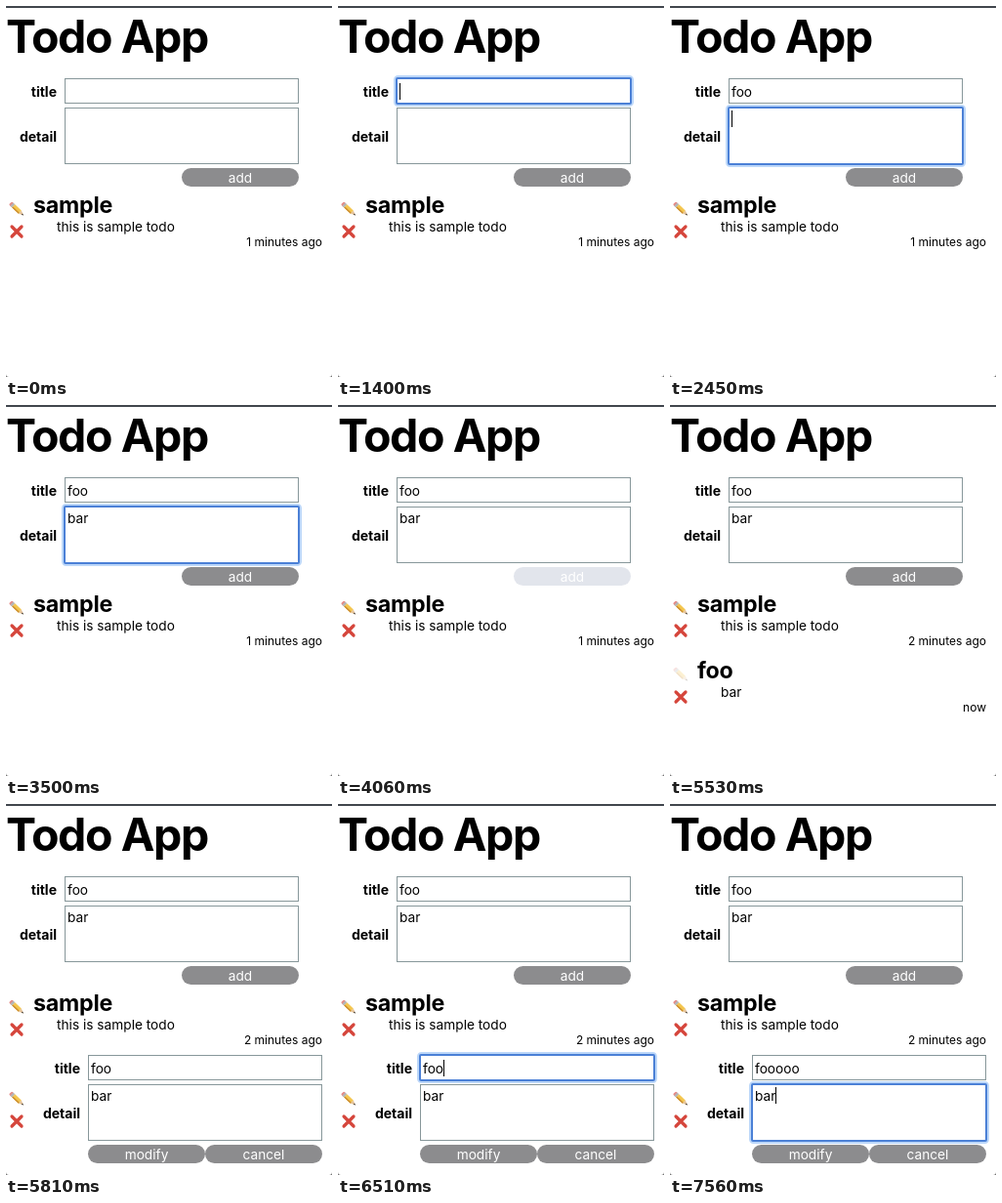
These frames come from a looping animation (334 px wide and 380 px high, 8 s). An HTML page:

```html
<!DOCTYPE html>
<html lang="en">
<head>
<meta charset="utf-8">
<title>Todo App</title>
<style>
  html, body { margin: 0; width: 100%; height: 100%; overflow: hidden; background: #fff; }
  svg { display: block; width: 334px; height: 380px; }
  text { font: 13.7px Inter, "Noto Sans", sans-serif; fill: #000; }
  .heading { font-size: 46.5px; font-weight: 700; letter-spacing: -1.4px; }
  .name { font-size: 23.25px; font-weight: 700; letter-spacing: -.25px; }
  .label { font-size: 14px; font-weight: 700; text-anchor: end; }
  .age { font-size: 12px; text-anchor: end; }
  .button { fill: #fff; text-anchor: middle; }
  .field { fill: #fff; stroke: #87979a; }
  .glow { fill: none; stroke: #8fbcf6; stroke-width: 3; stroke-opacity: .6; }
  .ring { fill: none; stroke: #4b80d6; stroke-width: 2; }
</style>
</head>
<body>
<svg id="stage" viewBox="0 0 334 380"></svg>
<script>
const LOOP = 8000;
const stage = document.getElementById('stage');
const pen = document.createElement('canvas').getContext('2d');
pen.font = '13.7px Inter, "Noto Sans", sans-serif';

const text = (x, y, value, kind = '') => `<text x="${x}" y="${y}" class="${kind}">${value}</text>`;

// Text typed so far: one more character at each given time.
const typed = (t, start, added, times) => start + added.slice(0, times.filter(at => t >= at).length);

function field(x, y, height, value, focused, caretOn = true) {
  const box = (grow, kind, radius = 0) =>
    `<rect x="${x - grow}" y="${y - grow}" width="${240 + 2 * grow}" height="${height + 2 * grow}" rx="${radius}" class="${kind}"/>`;
  const top = height > 30 ? y + 3 : y + 5;
  let out = focused ? box(1.5, 'glow', 3) + box(-.5, 'field') + box(0, 'ring', 1) : box(-.5, 'field');
  out += text(x + 3, top + 14, value);
  if (focused && caretOn) {
    const caretX = Math.round(x + 3 + pen.measureText(value).width);
    out += `<rect x="${caretX}" y="${top}" width="1" height="17"/>`;
  }
  return out;
}

function button(x, y, label, disabled = false) {
  return `<rect x="${x}" y="${y}" width="120" height="19" rx="9.5" fill="${disabled ? '#e2e5ec' : '#8c8c8e'}"/>`
    + text(x + 60, y + 15, label, 'button');
}

function form(x, y, title, detail, focus, caretOn) {
  return text(x - 8, y + 19, 'title', 'label')
    + text(x - 8, y + 65, 'detail', 'label')
    + field(x, y, 26, title, focus === 'title', caretOn)
    + field(x, y + 30, 58, detail, focus === 'detail', caretOn);
}

// Pencil above a red cross.
function icons(y, pencilOpacity = 1) {
  return `<g transform="translate(11 ${y}) rotate(43)" opacity="${pencilOpacity}">
      <rect x="-9" y="-2.2" width="4" height="4.4" rx="1.2" fill="#e58a86"/>
      <rect x="-7" y="-2.2" width="2.5" height="4.4" fill="#b4b7b8"/>
      <rect x="-4.5" y="-2.2" width="9" height="4.4" fill="#f4c64f"/>
      <rect x="-4.5" y=".8" width="9" height="1.4" fill="#c98a2c"/>
      <path d="M4.5-2.2L9.5 0 4.5 2.2z" fill="#e6c49b"/>
      <path d="M7.4-.9L9.5 0 7.4.9z" fill="#333"/>
    </g>
    <path transform="translate(11 ${y + 23})" d="M-5-5L5 5M5-5L-5 5" stroke="#d5453b" stroke-width="3.2" stroke-linecap="round"/>`;
}

function item(y, name, detail, age, pencilOpacity) {
  return icons(y, pencilOpacity) + text(28, y + 4, name, 'name')
    + text(52, y + 23, detail) + text(324, y + 38, age, 'age');
}

function scene(t) {
  const submitting = t >= 4060 && t < 4200;
  const added = t >= 4200;
  const editing = t >= 5670;

  const title = typed(t, '', 'foo', [1750, 1890, 2170]);
  const detail = typed(t, '', 'bar', [2730, 2800, 3010]);
  const focus = t < 1400 || t >= 4060 ? '' : t < 2450 ? 'title' : 'detail';

  let out = '<rect width="334" height="2" fill="#41464d"/>'
    + '<path d="M0 377q0 3 3 3H0zM334 377q0 3-3 3h3z" fill="#666"/>'
    + text(0, 48, 'Todo App', 'heading')
    + form(60, 74, title, detail, focus, t < 3430)
    + button(180, 166, 'add', submitting)
    + item(208, 'sample', 'this is sample todo', `${added ? 2 : 1} minutes ago`);

  if (editing) {
    const newTitle = typed(t, 'foo', 'ooo', [6930, 7140, 7280]);
    const editFocus = t < 6510 ? '' : t < 7560 ? 'title' : 'detail';
    out += icons(302)
      + form(84, 257, newTitle, 'bar', editFocus)
      + button(84, 349, 'modify') + button(204, 349, 'cancel');
  } else if (added) {
    out += item(276, 'foo', 'bar', 'now', t >= 5530 ? .25 : 1);
  }
  return out;
}

let shown = '';
function frame() {
  const next = scene(performance.now() % LOOP);
  if (next !== shown) stage.innerHTML = shown = next;
  requestAnimationFrame(frame);
}
frame();
</script>
</body>
</html>
```
